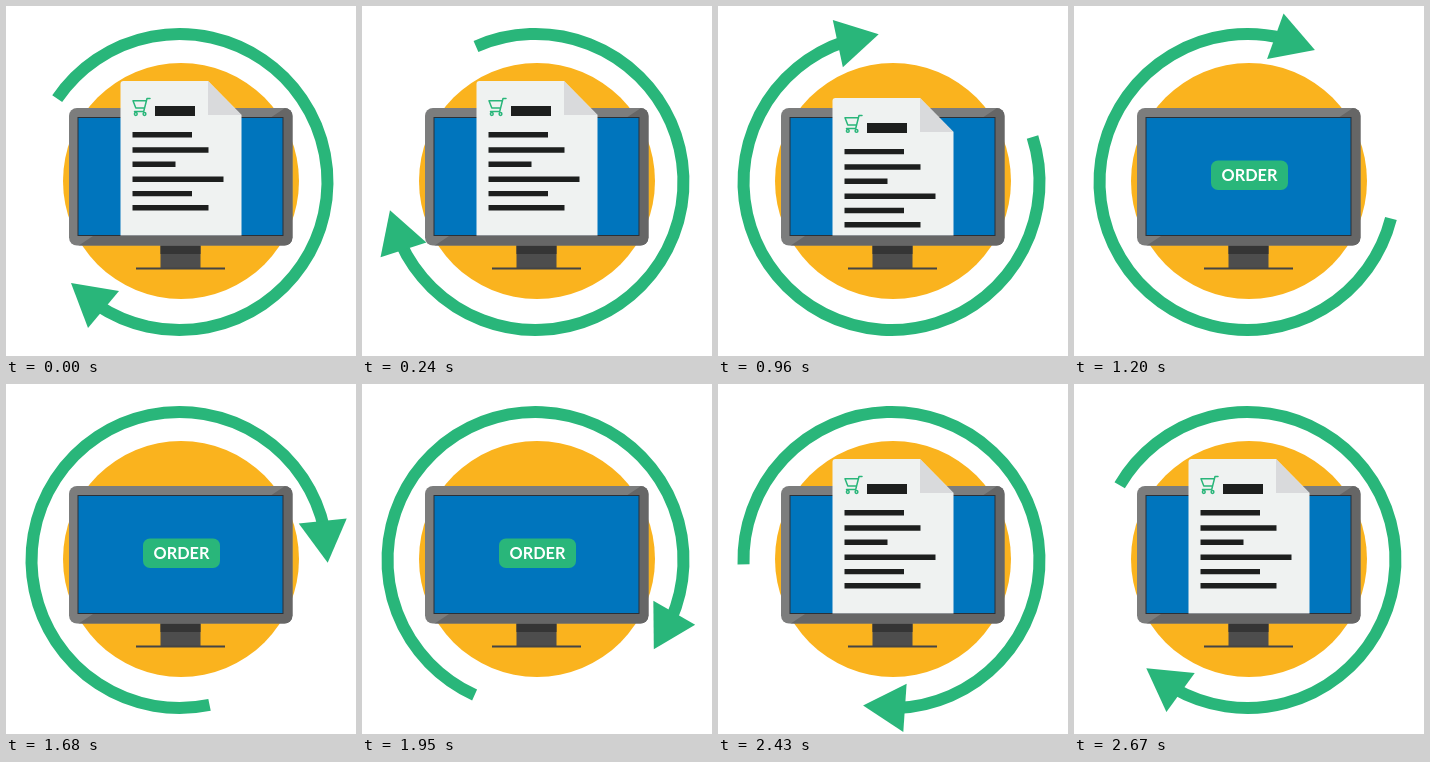
These frames come from a looping animation (350x350 px, 2.7 s). An HTML page:

```html
<!DOCTYPE html>
<html lang="en">
<head>
<meta charset="utf-8">
<title>Order loop</title>
<style>
  html, body { margin: 0; width: 100%; height: 100%; overflow: hidden; background: #fff; }
  svg { display: block; width: 100vw; height: 100vh; }
  text { font: 700 16.3px Lato, sans-serif; fill: #fff; text-anchor: middle; }
</style>
</head>
<body>
<svg viewBox="0 0 350 350">
  <defs>
    <clipPath id="aboveScreenEdge"><rect width="350" height="229.5"/></clipPath>
    <clipPath id="caseShape"><rect x="63" y="102" width="223.5" height="137.5" rx="8"/></clipPath>
  </defs>

  <circle cx="175" cy="175" r="118" fill="#fab31e"/>

  <g id="monitor">
    <path d="M154.5 239h40v23h-40z" fill="#4d4d4d"/>
    <path d="M154.5 239h40v9h-40z" fill="#353535"/>
    <path d="M130 261.5h89v2h-89z" fill="#444"/>
    <g clip-path="url(#caseShape)">
      <path d="M63 102h224v138H63z" fill="#7c7d7d"/>
      <path d="M72 240L279 102h8v138z" fill="#666"/>
    </g>
    <rect x="72" y="111.5" width="205" height="118" fill="#0075bd" stroke="#2b3138"/>
  </g>

  <rect x="137" y="154.5" width="77" height="29.5" rx="7" fill="#29b67a"/>
  <text x="175.5" y="175.2">ORDER</text>

  <g clip-path="url(#aboveScreenEdge)">
    <g id="paper">
      <path d="M114.5 235V78q0-3 3-3H202l33.5 34V235z" fill="#eff2f1"/>
      <path d="M202 75v34h33.5z" fill="#d9dadc"/>
      <path d="M149 100h40v10h-40z" fill="#1d1f1e"/>
      <path d="M126.5 128.7H186M126.5 144h76M126.5 158.3h43M126.5 173.3h91M126.5 187.6H186M126.5 201.8h76"
            stroke="#1d1f1e" stroke-width="5.4"/>
      <g fill="none" stroke="#29b67a" stroke-width="1.5" stroke-linejoin="round" stroke-linecap="round">
        <path d="M144 92.5h-3l-3.3 13H128.500M140.300 94.800H127l2.800 7.200h8.400"/>
        <circle cx="129.800" cy="108" r="1.400"/>
        <circle cx="138.500" cy="108" r="1.400"/>
      </g>
    </g>
  </g>

  <g id="arrow">
    <path d="M-122.300 -83.400A148 148 0 1 1 -82.800 122.700" fill="none" stroke="#29b67a" stroke-width="12"/>
    <path d="M-108.500 101L-60.500 109L-91.500 146z" fill="#29b67a"/>
  </g>
</svg>
<script>
  const LOOP = 2700, STEP = 30, TRAVEL = 163;
  const arrow = document.getElementById('arrow');
  const paper = document.getElementById('paper');

  // Eased progress from 0 to 1 over 300 ms
  function ease(t, start) {
    const p = Math.min(1, Math.max(0, (t - start) / 300));
    return p * p * (3 - 2 * p);
  }

  function draw(now) {
    const t = Math.floor((now % LOOP) / STEP) * STEP;
    const drop = TRAVEL * (ease(t, 900) - ease(t, 2120));
    arrow.setAttribute('transform', `translate(173.5 176) rotate(${t / LOOP * 360})`);
    paper.setAttribute('transform', `translate(0 ${drop})`);
    requestAnimationFrame(() => draw(performance.now()));
  }
  draw(0);
</script>
</body>
</html>
```
